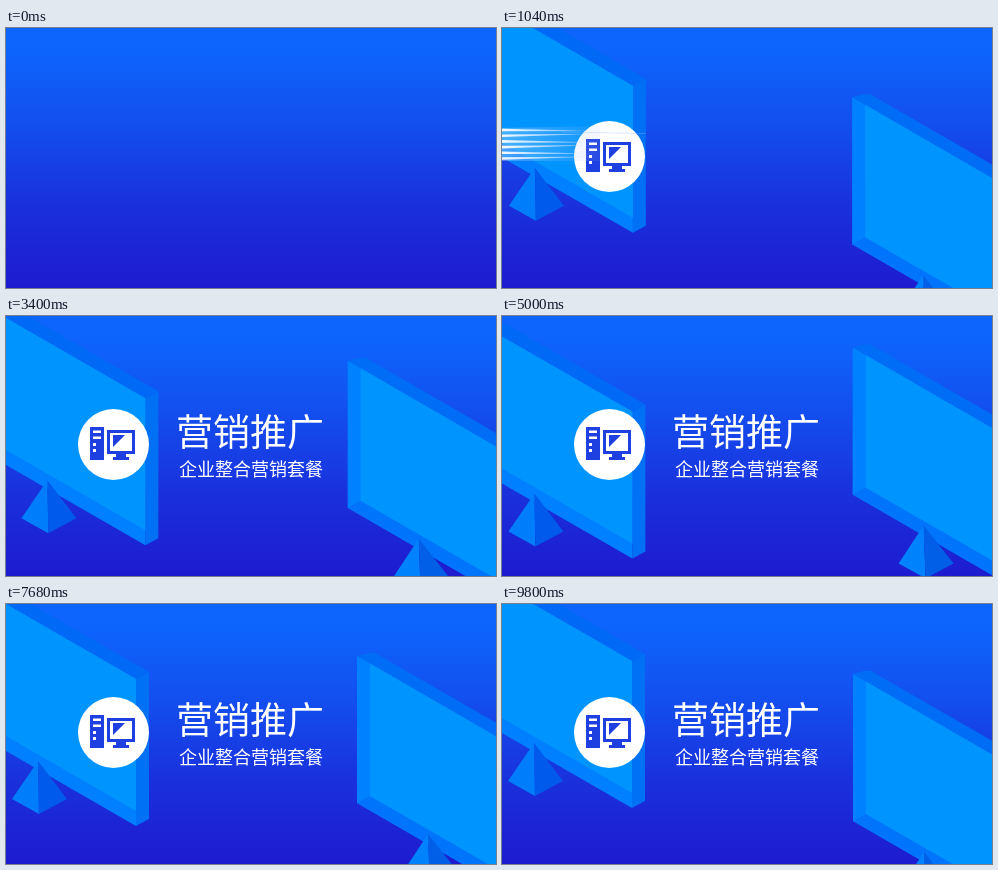
Write an HTML page that moves like this. It is 490 by 260 pixels and loops after 10 s.

```html
<!DOCTYPE html>
<html lang="zh-CN">
<head>
<meta charset="utf-8">
<style>
  html, body { margin: 0; width: 100%; height: 100%; overflow: hidden; }
  svg { display: block; width: 490px; height: 260px; }
  text { fill: #fff; font-family: "Noto Sans CJK SC", "Noto Sans CJK", sans-serif; }
</style>
</head>
<body>
<svg viewBox="0 0 490 260">
  <defs>
    <linearGradient id="sky" x2="0" y2="1">
      <stop offset=".08" stop-color="#0d65fd"/>
      <stop offset=".35" stop-color="#1350f0"/>
      <stop offset=".7" stop-color="#1a2fdb"/>
      <stop offset="1" stop-color="#1e1bd0"/>
    </linearGradient>
    <linearGradient id="trail" gradientUnits="userSpaceOnUse" x1="0" x2="98">
      <stop stop-color="#fff" stop-opacity=".95"/>
      <stop offset=".7" stop-color="#d8e6ff" stop-opacity=".6"/>
      <stop offset="1" stop-color="#b0c8ff" stop-opacity="0"/>
    </linearGradient>
    <linearGradient id="haze" gradientUnits="userSpaceOnUse" x1="0" x2="98">
      <stop stop-color="#fff" stop-opacity=".28"/>
      <stop offset="1" stop-color="#9ab8ff" stop-opacity=".1"/>
    </linearGradient>
  </defs>

  <rect width="490" height="260" fill="url(#sky)"/>

  <g id="left">
    <path fill="#0069f5" d="M-170-116L130 57L143 50L-157-123Z"/>
    <path fill="#0070f5" d="M130 57L143 50V197L130 204Z"/>
    <path fill="#0080ff" d="M-170-116L130 57V204L-170 31Z"/>
    <path fill="#0094ff" d="M-170-116L130 57V189L-170 16Z"/>
    <path fill="#007dfa" d="M32 139L6 177L33 192Z"/>
    <path fill="#005aeb" d="M32 139L61 177L33 192Z"/>
  </g>

  <g id="right">
    <path fill="#006df6" d="M351 70L362 67H369L669 240V254Z"/>
    <path fill="#0081ff" d="M351 70L669 254V401L351 217Z"/>
    <path fill="#0074fa" d="M351 217L364 210L669 386V401Z"/>
    <path fill="#0094ff" d="M364 77.5L669 254V386L364 210Z"/>
    <path fill="#0082fc" d="M422 248L397 286L424 301Z"/>
    <path fill="#005fe6" d="M422 248L452 286L424 301Z"/>
  </g>

  <g id="icon" fill="#1f40e0">
    <circle cx="107.5" cy="128.5" r="35.5" fill="#fff"/>
    <path fill-rule="evenodd" d="M84 111h14v33h-14zM87 114.5v2.5h8v-2.5zM87 120.5v2.5h8v-2.5zM87 127v3h3v-3zM87 133v3h3v-3z"/>
    <path fill-rule="evenodd" d="M101 114h28v24h-28zM104 117v18h22v-18z"/>
    <path d="M107 119h12L107 131zM110 138h10v3h3v3h-16v-3h3z"/>
  </g>

  <g id="streaks"></g>

  <text id="title" x="170" y="130" font-size="37" font-weight="300">营销推广</text>
  <text id="subtitle" x="173" y="159.5" font-size="18">企业整合营销套餐</text>
</svg>
<script>
const LOOP = 10000;
const $ = id => document.getElementById(id);
const progress = (t, from, to) => Math.min(1, Math.max(0, (t - from) / (to - from)));
const easeInOut = p => (1 - Math.cos(Math.PI * p)) / 2;
const easeOut = p => 1 - (1 - p) ** 3;
const move = (id, x, y) => $(id).setAttribute('transform', `translate(${x} ${y})`);
const fade = (id, opacity) => $(id).setAttribute('opacity', opacity);

let trails = '<path fill="url(#haze)" d="M0 100L98 98V133H0Z"/>';
for (let i = 0; i < 6; i++) {
  const y = 102 + i * 5.7;
  trails += `<path fill="url(#trail)" d="M0 ${y - 1.3}L98 ${y + (i % 2 ? -2 : 1)}L0 ${y + 1.3}Z"/>`;
}
$('streaks').innerHTML = trails +
  '<path fill="none" stroke="#9ab8ff" stroke-opacity=".35" d="M60 104L144 105.5"/>';

function draw(t) {
  // Monitors slide in, swing along an arc, then return straight.
  const away = 1 - easeOut(progress(t, 0, 600));
  const out = easeInOut(progress(t, 600, 5300));
  const back = easeInOut(progress(t, 5300, 9850));
  const dx = 41 * out * (1 - out);
  const dy = 39 * (out - back);
  move('left', dx - 160 * away, dy);
  move('right', -dx + 155 * away, -dy);

  const flight = 1 - easeOut(progress(t, 600, 1000));
  move('icon', -150 * flight, 0);
  move('streaks', -150 * flight, 0);
  fade('streaks', t < 600 ? 0 : 1 - progress(t, 1040, 1320));

  fade('title', progress(t, 1200, 1680));
  fade('subtitle', progress(t, 1520, 2000));
}

const start = performance.now();
function tick() {
  draw((performance.now() - start) % LOOP);
  requestAnimationFrame(tick);
}
draw(0);
tick();
</script>
</body>
</html>
```
